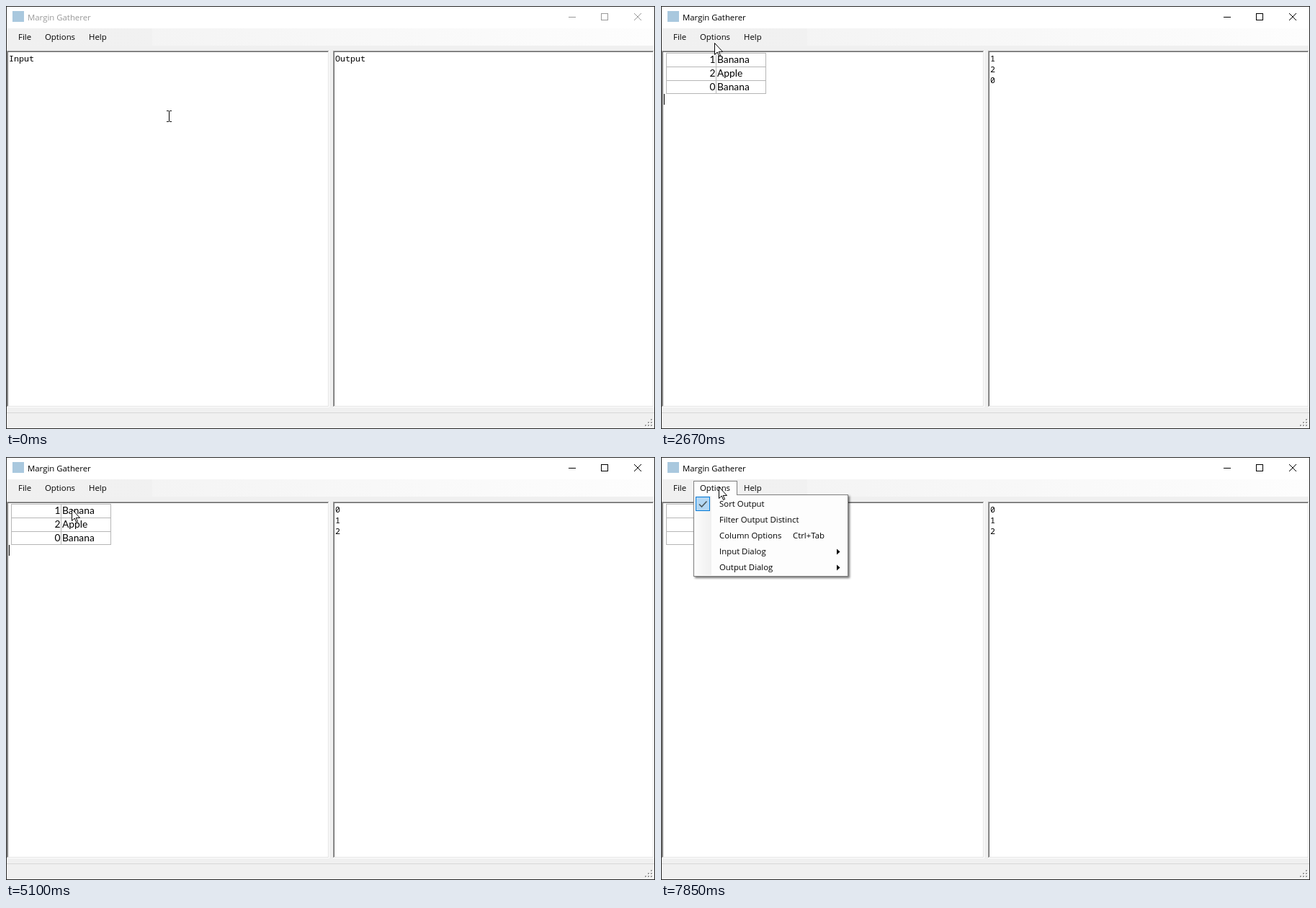
These frames come from a looping animation (901x587 px, 8 s). An HTML page:

```html
<!DOCTYPE html>
<html lang="en">
<head>
<meta charset="utf-8">
<title>Margin Gatherer</title>
<style>
  html, body { margin: 0; width: 100%; height: 100%; overflow: hidden; background: #f0f0f0; }
  svg { display: block; width: 100%; height: 100%; }
  text { font: 11.4px "Open Sans", "Noto Sans", sans-serif; white-space: pre; }
  .mono text { font: 11.67px "Noto Sans Mono", "DejaVu Sans Mono", monospace; }
  .cells text { font: 13.8px Lato, "Open Sans", sans-serif; }
  .crisp { shape-rendering: crispEdges; }
  .hot { fill: #b3d7f3; stroke: #0078d7; }
  .popup { fill: #fdfdfd; stroke: #808080; filter: drop-shadow(2px 2px 1.5px rgba(0, 0, 0, .55)); }
</style>
</head>
<body>
<svg viewBox="0 0 901 587" preserveAspectRatio="none">
  <defs>
    <linearGradient id="strip">
      <stop offset="0" stop-color="#f0f0f0"/><stop offset=".224" stop-color="#f1f1f1"/>
      <stop offset=".225" stop-color="#f4f4f4"/><stop offset="1" stop-color="#fdfdfd"/>
    </linearGradient>
    <linearGradient id="gutter">
      <stop offset="0" stop-color="#fcfcfc"/><stop offset="1" stop-color="#f0f0f0"/>
    </linearGradient>
  </defs>

  <g class="crisp">
    <rect x=".5" y=".5" width="900" height="586" fill="#f0f0f0" stroke="#262626"/>
    <rect x="1" y="1" width="899" height="30" fill="#fff"/>
    <rect x="1" y="31" width="899" height="24" fill="url(#strip)"/>
    <rect x="9" y="7" width="16" height="15" fill="#a9c8de"/>
    <path d="M1 564.5H900" stroke="#d7d7d7"/>
    <g id="panes"></g>
    <g id="grip"></g>
  </g>

  <text id="title" x="30" y="20">Margin Gatherer</text>
  <g id="buttons" fill="none">
    <path class="crisp" d="M781 15.5h10M826.5 10.5h9v9h-9z"/>
    <path d="M872 10l10 10M882 10l-10 10"/>
  </g>

  <g class="mono">
    <rect id="selection" x="4" y="65" width="42" height="15" fill="#99c9ef"/>
    <text id="inputHint" x="4" y="77">Input</text>
    <g id="output"></g>
  </g>

  <g id="table" class="cells">
    <path class="crisp" d="M7.5 65.5h138v56h-138zM76.5 65v57M7 84.5h139M7 103.5h139" fill="none" stroke="#b6b6b6"/>
  </g>
  <path id="caret" class="crisp" d="M4.5 122v15" stroke="#000"/>

  <rect id="hover" class="hot crisp" x="45.5" y="33.5" width="60" height="19"/>
  <g id="menu">
    <rect class="popup" x="45.5" y="52.5" width="214" height="113"/>
    <rect x="46" y="54" width="24" height="110" fill="url(#gutter)"/>
    <path class="crisp" d="M45.5 53V33.5h60V53" fill="#fdfdfd" stroke="#808080"/>
    <rect id="sortHover" class="hot crisp" x="47.5" y="54.5" width="210" height="21"/>
    <g id="check">
      <rect class="hot crisp" x="48.5" y="55.5" width="19" height="19"/>
      <path d="M53 65.5l3.5 3.5 7-7.5" fill="none" stroke="#4c5a5e" stroke-width="1.6"/>
    </g>
    <g id="items"></g>
    <path d="M244 127.5l4.5 4-4.5 4zM244 149.5l4.5 4-4.5 4z"/>
  </g>
  <g id="bar"></g>

  <circle id="click" r="12" fill="#ff0" fill-opacity=".5"/>
  <path id="arrow" d="M.5 .5v16l3.7-3.5 2.4 5.5 2-.9-2.4-5.2h5.3z" fill="#fff" stroke="#000"/>
  <path id="beam" class="crisp" d="M-3-8h3v1h1v-1h3v1h-3v14h3v1h-3v-1h-1v1h-3v-1h3v-14h-3z"/>
</svg>

<script>
const LOOP = 8000;
const $ = id => document.getElementById(id);
const show = (id, on) => { $(id).style.display = on ? "" : "none"; };

function add(parent, tag, attrs, label = "") {
  const node = document.createElementNS("http://www.w3.org/2000/svg", tag);
  for (const key in attrs) node.setAttribute(key, attrs[key]);
  node.textContent = label;
  return $(parent).appendChild(node);
}
const write = (parent, x, y, label, more = {}) => add(parent, "text", { x, y, ...more }, label);

// Sunken edge of a text pane
for (const x of [1, 454]) {
  const w = x === 1 ? 448 : 446;
  const box = (inset, far, fill) => add("panes", "rect",
    { x: x + inset, y: 62 + inset, width: w - inset - far, height: 495 - inset - far, fill });
  box(0, 0, "#fff");
  box(0, 1, "#a0a0a0");
  box(1, 1, "#e3e3e3");
  box(1, 2, "#696969");
  box(2, 2, "#fff");
}

for (let row = 0; row < 3; row++)
  for (let col = 2 - row; col < 3; col++) {
    const dot = (d, fill) => add("grip", "rect",
      { x: 887 + col * 4 + d, y: 573 + row * 4 + d, width: 2, height: 2, fill });
    dot(1, "#fff");
    dot(0, "#a0a0a0");
  }

[["File", 17], ["Options", 54], ["Help", 115]].forEach(([label, x]) => write("bar", x, 47, label));
["Sort Output", "Filter Output Distinct", "Column Options", "Input Dialog", "Output Dialog"]
  .forEach((label, i) => write("items", 81, 69 + i * 22, label));
write("items", 183, 113, "Ctrl+Tab");

[[1, "Banana"], [2, "Apple"], [0, "Banana"]].forEach(([number, fruit], i) => {
  write("table", 75.5, 79 + i * 19, number, { "text-anchor": "end" });
  write("table", 78, 79 + i * 19, fruit);
});
const lines = [0, 1, 2].map(i => write("output", 457, 77 + i * 15, ""));

// Pointer positions: [time, x, y], each held until the next
const pointer = [[0, 226, 153], [1000, 226, 152], [1220, 227, 152], [1630, 227, 153]];

// Adds evenly timed steps along waypoints [step, x, y]
function glide(from, to, ...stops) {
  const last = stops[stops.length - 1][0];
  for (let k = 0; k <= last; k++) {
    const i = Math.max(1, stops.findIndex(s => s[0] >= k));
    const [a, b] = [stops[i - 1], stops[i]];
    const p = (k - a[0]) / (b[0] - a[0]);
    const at = n => Math.round(a[n] + (b[n] - a[n]) * p);
    pointer.push([Math.floor((from + (to - from) * k / last) / 10) * 10, at(1), at(2)]);
  }
}
glide(2340, 2790, [0, 217, 147], [3, 117, 82], [5, 74, 51], [7, 62, 47]);
glide(3830, 4110, [0, 64, 49], [3, 86, 68], [4, 90, 72]);
pointer.push([4510, 91, 72]);
glide(5440, 5910, [0, 108, 73], [2, 208, 78], [5, 404, 83], [6, 450, 83], [7, 477, 83]);
glide(6140, 6860, [0, 472, 82], [3, 370, 76], [6, 200, 60], [9, 95, 44], [11, 80, 41]);

const clicks = [[230, 350], [3190, 3370], [4760, 5100], [7730, 7850]];
const menus = [[3250, 5040], [7730, LOOP]];
const within = (spans, t) => spans.some(([a, b]) => t >= a && t < b);

function render(t) {
  const [, x, y] = pointer.filter(p => p[0] <= t).pop();
  const open = within(menus, t);
  const pasted = t >= 1630;
  const sorted = t >= 5100;
  const active = t >= 230;

  $("title").setAttribute("fill", active ? "#000" : "#999");
  $("buttons").setAttribute("stroke", active ? "#000" : "#999");
  show("selection", t >= 1000 && !pasted);
  show("inputHint", !pasted);
  show("table", pasted);
  show("caret", pasted && !open);
  const words = !pasted ? ["Output", "", ""] : sorted ? [0, 1, 2] : [1, 2, 0];
  lines.forEach((line, i) => { line.textContent = words[i]; });

  show("menu", open);
  show("check", sorted);
  show("sortHover", y >= 54);
  show("hover", !open && x >= 45 && x < 106 && y < 51);

  const isArrow = open || y < 62 || (t >= 5040 && t < 5440);
  show("arrow", isArrow);
  show("beam", !isArrow);
  show("click", within(clicks, t));
  for (const id of ["arrow", "beam", "click"])
    $(id).setAttribute("transform", `translate(${x} ${y})`);
}

function tick() {
  render(performance.now() % LOOP);
  requestAnimationFrame(tick);
}
tick();
</script>
</body>
</html>
```
